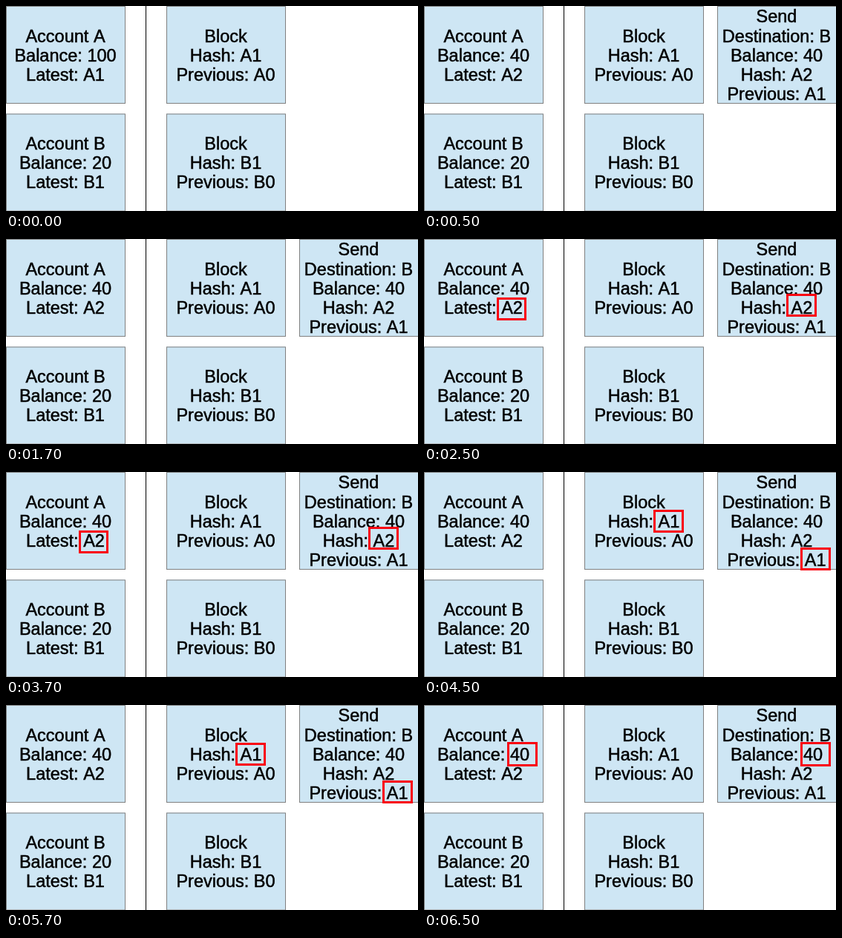
Recreate the animation shown at these times as an HTML page with a canvas. Size 555 by 277 pixels, loop 8000 ms.

```html
<!DOCTYPE html>
<html lang="en">
<head>
<meta charset="utf-8">
<title>Account blocks</title>
<style>
html, body { margin: 0; width: 100%; height: 100%; overflow: hidden; background: #fff; }
canvas { display: block; }
</style>
</head>
<body>
<canvas id="stage" width="555" height="277"></canvas>
<script>
const ctx = document.getElementById("stage").getContext("2d");
const LOOP = 8000;
const LINE = 26.2;

// Highlight boxes: start and end time, then x, y, width, height of each outer edge
const marks = [
  { from: 2500, to: 4500, boxes: [[98, 79, 40, 31], [488, 74, 41, 31]] },
  { from: 4500, to: 6500, boxes: [[309, 51, 41, 31], [507, 102, 41, 31]] },
  { from: 6500, to: LOOP, boxes: [[112, 50, 41, 33], [507, 50, 41, 33]] }
];

function card(x, y, lines) {
  ctx.fillStyle = "#cee6f4";
  ctx.fillRect(x, y, 160, 131);
  ctx.strokeStyle = "#808080";
  ctx.lineWidth = 1;
  ctx.strokeRect(x + 0.5, y + 0.5, 160, 131);

  ctx.fillStyle = ctx.strokeStyle = "#000";
  ctx.lineWidth = 0.5;
  const first = y + 74.75 - (lines.length - 1) / 2 * LINE;
  lines.forEach((text, i) => {
    const baseline = Math.round(first + i * LINE);
    ctx.fillText(text, x + 80, baseline);
    ctx.strokeText(text, x + 80, baseline);
  });
}

function draw(t) {
  const sent = t >= 500;
  ctx.fillStyle = "#fff";
  ctx.fillRect(0, 0, 555, 277);
  ctx.font = '23.5px "Liberation Sans", Arial, sans-serif';
  ctx.textAlign = "center";

  card(0, 0, ["Account A", "Balance: " + (sent ? 40 : 100), "Latest: " + (sent ? "A2" : "A1")]);
  card(0, 145.5, ["Account B", "Balance: 20", "Latest: B1"]);
  card(216, 0, ["Block", "Hash: A1", "Previous: A0"]);
  card(216, 145.5, ["Block", "Hash: B1", "Previous: B0"]);
  if (sent) {
    card(395, 0, ["Send", "Destination: B", "Balance: 40", "Hash: A2", "Previous: A1"]);
  }
  ctx.fillStyle = "#000";
  ctx.fillRect(188, 0, 1, 277);

  ctx.strokeStyle = "#f8000f";
  ctx.lineWidth = 3;
  for (const { from, to, boxes } of marks) {
    if (t < from || t >= to) continue;
    for (const [x, y, w, h] of boxes) ctx.strokeRect(x + 1.5, y + 1.5, w - 3, h - 3);
  }
}

const start = performance.now();
function tick() {
  draw((performance.now() - start) % LOOP);
  requestAnimationFrame(tick);
}
tick();
</script>
</body>
</html>
```
